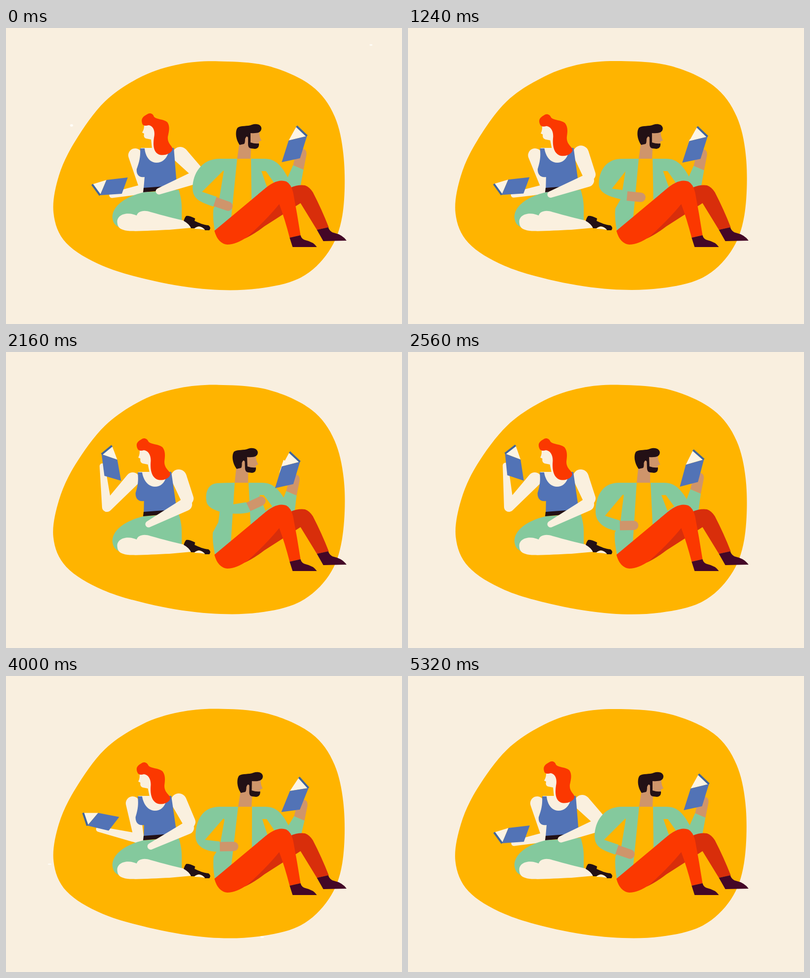
These frames come from a looping animation (800x600 px, 5360 ms). An HTML page:

```html
<!DOCTYPE html>
<html lang="en">
<head>
<meta charset="utf-8">
<title>Two readers</title>
<style>
  html, body { margin: 0; width: 100%; height: 100%; overflow: hidden; background: #f9efdf; }
  svg { display: block; width: 100vw; height: 100vh; }
  .skin { fill: #faf0df; }
  .tan { fill: #cf956b; }
  .green { fill: #84c99d; }
  .blue { fill: #5273b6; }
  .red { fill: #fb3800; }
  .dark { fill: #231015; }
  .shoe { fill: #440727; }
  .page { fill: #fcf4e4; }
  .spine { stroke: #40659c; stroke-width: 4; }
</style>
</head>
<body>
<svg viewBox="0 0 800 600">
  <path id="blob" fill="#ffb400"/>
  <g id="specks" fill="#fffdf8"></g>

  <!-- woman -->
  <path id="farArm" class="skin"/>
  <path id="nearUpper" class="skin"/>
  <g id="bust">
    <path class="skin" d="M272,243L338,243L324,276L286,276Z"/>
    <path class="blue" d="M271,244L280,244C282,263 292,273 304,273C318,273 328,262 330,243L339,243L344,306L346,321L278,326L280,302C268,304 263,296 264,286C269,272 272,262 271,244Z"/>
  </g>
  <path class="green" d="M278,333C240,342 214,362 215,384C216,396 222,402 232,405L355,391L355,365C355,350 352,338 349,328Z"/>
  <path class="dark" d="M278,324L346,319L346,327L277,333Z"/>
  <path class="skin" d="M225,396C222,379 243,371 264,380C266,372 278,368 292,373C320,381 340,386 358,390L370,395Q376,402 374,405L330,409C300,410 265,413 245,411C232,409 226,405 225,396Z"/>
  <path class="dark" d="M359,391Q361,384 364,381Q370,380 382,386L381,391C390,395 398,399 409,400Q415,404 411,410L402,410Q392,397 381,406L374,406Q370,397 359,391Z"/>
  <path class="skin" d="M380,407Q391,397 402,409Q391,407 380,407Z"/>
  <path id="nearFore" class="skin"/>
  <g id="herHead">
    <path class="skin" d="M279,194Q280,204 275,212L279,214Q277,222 283,224L293,226L295,245L325,245L312,195Z"/>
    <path class="red" d="M275,193C272,183 278,179 285,175C290,171 297,173 299,180C305,186 318,184 326,191C332,200 329,210 327,220C325,236 339,240 336,247C332,256 317,260 308,256C297,250 297,235 299,222C302,208 297,198 288,197C281,199 276,198 275,193Z"/>
  </g>
  <!-- drawn around its lower spine end -->
  <g id="herBook">
    <path class="page" d="M0,0L-16,-22L13,-31Z"/>
    <path class="blue" d="M0,0L13,-31L56,-36L44,-3Z"/>
    <path class="spine" d="M0,0L-16,-22"/>
  </g>

  <!-- man -->
  <g id="torso">
    <path class="tan" d="M470,212L512,210Q511,219 516,228L511,230L511,238L495,245L494,265L467,265L472,230Z"/>
    <path class="dark" d="M472,237C463,224 463,208 468,202C475,197 488,200 497,196C505,193 515,195 516,203C516,212 508,214 494,213L494,232Q503,235 511,234Q512,244 503,245L495,244Q489,243 489,236L489,222Q486,217 483,225Q483,233 481,235Z"/>
    <path class="green" d="M467,265L430,266L440,290L431,345L419,366Q417,385 422,412L455,384Z"/>
    <path class="green" fill-rule="evenodd" d="M495,265L520,265C545,264 557,280 570,304L575,340L496,350ZM516,290L525,290L541,313L527,322Z"/>
  </g>
  <path id="rightFore" class="green"/>
  <path id="leftHand" stroke="#cf956b" stroke-width="19" stroke-linecap="round"/>
  <path id="leftArm" class="green"/>
  <path id="rightHand" class="tan" d="M580,278L584,262L597,245Q608,244 607,257L601,287Z"/>
  <g id="hisBook">
    <path id="flap" class="page" d="M578,204L585,208L571,234L560,255Z"/>
    <path class="page" d="M608,219L587,199L571,228Z"/>
    <path class="blue" d="M608,219L571,228L557,272L594,264Z"/>
    <path class="spine" d="M608,219L587,199"/>
  </g>
  <path fill="#d82e0b" d="M482,427L574,324Q590,317 604,319Q613,322 620,333Q638,368 652,404L628,409L595,355L522,402Q500,419 482,427Z"/>
  <path class="red" d="M421,411L520,328Q547,304 566,311Q576,316 580,333Q588,375 595,420L573,425Q563,386 552,357Q525,390 488,423Q465,439 447,439Q428,437 421,411Z"/>
  <path class="shoe" d="M628,409L651,404Q654,413 662,415Q680,419 688,431L641,432Z"/>
  <path class="shoe" d="M573,425L595,420Q597,428 605,430Q622,434 628,444L579,444Z"/>
</svg>
<script>
const LOOP = 5360, STEP = 40;
const $ = id => document.getElementById(id);
const draw = (id, d) => $(id).setAttribute('d', d);
const move = (id, transform) => $(id).setAttribute('transform', transform);
const mix = (a, b, k) => a + (b - a) * k;
const mixAll = (a, b, k) => a.map((v, i) => mix(v, b[i], k));
const random = seed => { const v = Math.sin(seed * 12.9898) * 43758.5453; return v - Math.floor(v); };

function ease(t, from, to) {
  const k = Math.min(1, Math.max(0, (t - from) / (to - from)));
  return k * k * (3 - 2 * k);
}
// Rises from 0 to 1 between a and b, falls back between c and d.
const pulse = (t, a, b, c, d) => ease(t, a, b) - ease(t, c, d);

// Quadratic curve through three control points.
const arc = (p, q, r, k) => mixAll(mixAll(p, q, k), mixAll(q, r, k), k);

// Leans a part: still at height foot, shifted by dx at height top.
function lean(id, dx, foot, top, dy = 0) {
  const k = dx / (foot - top);
  move(id, `matrix(1 0 ${-k} 1 ${k * foot} ${dy})`);
}

// Tapered limb segment between two circles.
function capsule([ax, ay], ra, [bx, by], rb) {
  const dir = Math.atan2(by - ay, bx - ax);
  const tilt = Math.acos((ra - rb) / Math.hypot(bx - ax, by - ay));
  const on = (x, y, r, a) => `${x + r * Math.cos(a)},${y + r * Math.sin(a)}`;
  const big = ra > rb ? 1 : 0;
  return `M${on(ax, ay, ra, dir + tilt)}A${ra},${ra} 0 ${big} 1 ${on(ax, ay, ra, dir - tilt)}` +
    `L${on(bx, by, rb, dir - tilt)}A${rb},${rb} 0 ${1 - big} 1 ${on(bx, by, rb, dir + tilt)}Z`;
}

const EDGE = [[430,67], [530,77], [617,117], [664,180], [683,270], [679,380], [652,453],
  [595,506], [510,528], [410,530], [300,513], [195,482], [122,436], [96,375], [107,300],
  [140,228], [200,149], [275,98], [350,73]];

// Smooth closed outline with a slight hand-drawn tremble.
function blob(t) {
  const n = EDGE.length, beat = Math.floor(t / 120);
  const pts = EDGE.map((p, i) => p.map((v, j) => v + random(i * 2 + j + beat * 50) - 0.5));
  const at = i => pts[(i + n) % n];
  let d = 'M' + at(0);
  for (let i = 0; i < n; i++) {
    const [a, b, c, e] = [at(i - 1), at(i), at(i + 1), at(i + 2)];
    d += `C${b.map((v, j) => v + (c[j] - a[j]) / 6)} ${c.map((v, j) => v - (e[j] - b[j]) / 6)} ${c}`;
  }
  draw('blob', d + 'Z');
}

// Two grains of dust flash up once a second.
function specks(t) {
  const grain = s => `<ellipse cx="${800 * random(s)}" cy="${600 * random(s + 1)}" ` +
    `rx="${2 + 2 * random(s + 2)}" ry="${1 + 1.5 * random(s + 3)}"/>`;
  $('specks').innerHTML = t % 1000 ? '' : grain(t + 1) + grain(t + 7);
}

function woman(t) {
  const bend = pulse(t, 640, 1400, 4000, 4800);
  lean('herHead', -11.7 * bend, 290, 173, 2 * bend);
  lean('bust', -5 * bend, 321, 244);

  const lift = pulse(t, 1200, 2240, 3400, 4240);
  const turn = 88 * lift, a = turn * Math.PI / 180;
  const [x, y] = arc([190, 339], [109, 243], [196, 206], lift);
  move('herBook', `translate(${x} ${y}) rotate(${turn})`);
  const hand = [x + 24 * Math.cos(a), y + 24 * Math.sin(a)];
  const elbow = arc([280, 326], [222, 345], [204, 314], ease(lift, 0, 1));
  draw('farArm', capsule([261 - 5 * bend, 258], 14, elbow, 10) + capsule(elbow, 10, hand, 5.5));

  const rest = pulse(t, 400, 1040, 3700, 4745);
  const raise = pulse(t, 400, 800, 1000, 1400);
  const [ex, ey] = mixAll([385, 291], [366, 297], rest);
  const [hx, hy] = mixAll([309, 331], [288, 349], rest);
  draw('nearUpper', capsule([352 - 3 * bend, 257 - 3 * bend], 16, [ex, ey], 13));
  draw('nearFore', capsule([ex - 3, ey + 12], 13, [hx, hy - 33 * raise], 6.5));
}

function man(t) {
  const bend = -5 * pulse(t, 1100, 1640, 2560, 3200);
  const reach = pulse(t, 1100, 1640, 1880, 2480);
  const sway = pulse(t, 3200, 4000, 4000, 5200);
  lean('torso', bend + 2 * sway, 400, 265);

  const bx = 1.9 * bend - 8 * reach + 2 * sway, by = 7 * reach + 6 * sway;
  move('hisBook', `translate(${bx} ${by}) rotate(${bend / 2 + 3.5 * reach + 4.5 * sway} 583 235)`);
  move('flap', `translate(571 228) scale(${reach}) translate(-571 -228)`);
  move('rightHand', `translate(${bx} ${by})`);
  draw('rightFore', `M${580 + bx},${278 + by}L${601 + bx},${287 + by}L${594 + bx * 0.8},325L565,342L${569 + bx * 0.8},303Z`);

  const wx = mix(422 - 1.2 * bend + 10 * sway, 540, reach);
  const wy = mix(352 - 6 * sway, 283, reach);
  const a = mix(19 + 4 * bend - 20 * sway, -45, reach) * Math.PI / 180;
  const c = Math.cos(a), s = Math.sin(a);
  draw('leftHand', `M${wx - 2 * c},${wy - 2 * s}L${wx + 28 * c},${wy + 28 * s}`);

  const e = 377 - 0.4 * bend + 6 * sway, low = [wx - 10.5 * s, wy + 10.5 * c];
  const shape = (neck, top, outer, under, inner) =>
    [...neck, ...top, ...outer, ...under, ...low, wx + 10.5 * s, wy - 10.5 * c, ...inner];
  const folded = shape([467 + bend, 265], [430 + bend, 265],
    [395 + bend, 266, e, 295, e, 325], [e, 348, low[0] - 24 * c, low[1] - 24 * s],
    [e + 19, 332, 439 + bend, 289, 455 + bend, 300]);
  const across = shape([461, 265], [428, 267],
    [421, 268, 419, 282, 428, 292], [450, 318, 495, 328],
    [490, 293, 461, 277, 455, 285]);
  const p = mixAll(folded, across, reach);
  draw('leftArm', `M${p.slice(0, 2)}L${p.slice(2, 4)}C${p.slice(4, 16)}L${p.slice(16)}Z`);
}

function frame() {
  const t = Math.floor((performance.now() % LOOP) / STEP) * STEP;
  [blob, specks, woman, man].forEach(part => part(t));
  requestAnimationFrame(frame);
}
frame();
</script>
</body>
</html>
```
